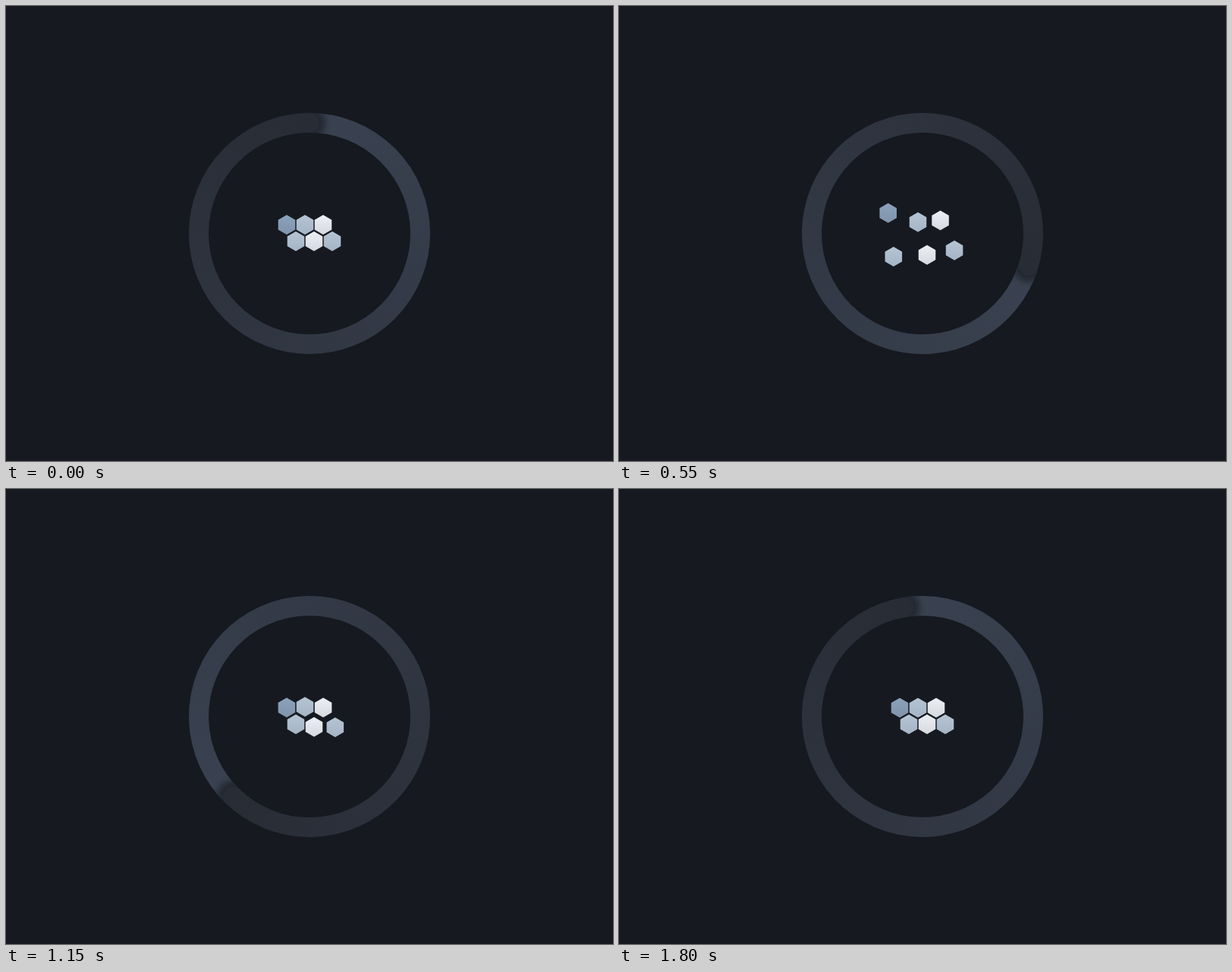
Write an HTML page with a canvas that moves like this. It is 800 px wide and 600 px high and loops after 1850 ms.

```html
<!DOCTYPE html>
<html lang="en">
<head>
<meta charset="utf-8">
<title>Hexagon loader</title>
<style>
  html, body { margin: 0; width: 100%; height: 100%; overflow: hidden; background: #161920; }
  canvas { display: block; }
</style>
</head>
<body>
<canvas id="stage" width="800" height="600"></canvas>
<script>
const ctx = document.getElementById('stage').getContext('2d');
const LOOP = 1850, STEP = 50, TAU = Math.PI * 2;
const RADIUS = 146, WIDTH = 26, CAP = WIDTH / 2;
const LIGHT = '#3a4251', DARK = '#282c35';

const white = ['#eceff3', '#d6dade'];
const pale = ['#b5c4d3', '#a5b5c6'];
const blue = ['#8ba2bb', '#8094ab'];

// Clockwise from the top right; each one starts 100 ms after the one before.
const hexes = [
  { x: 418, y: 288.4, dx: 1, dy: -1, reach: 19.6, land: 714, fill: white },
  { x: 430, y: 310.3, dx: 1, dy: 1, reach: 20, land: 704, fill: pale },
  { x: 406, y: 310.3, dx: 0, dy: 1, reach: 19.5, land: 775, fill: white },
  { x: 382, y: 310.3, dx: -1, dy: 1, reach: 20.2, land: 743, fill: pale },
  { x: 370, y: 288.4, dx: -1, dy: -1, reach: 24, land: 769, fill: blue },
  { x: 394, y: 288.4, dx: 0, dy: -1, reach: 37, land: 698, fill: pale }
];

// Smooth 0 to 1 between two times.
function ease(t, from, to) {
  const x = Math.min(1, Math.max(0, (t - from) / (to - from)));
  return (1 - Math.cos(Math.PI * x)) / 2;
}

// Out, back, then one small rebound.
function offset(t, { reach, land }) {
  const push = ease(t, 0, 255) - ease(t, 255, land);
  const rebound = ease(t, 850, 1005) - ease(t, 1005, 1165);
  return reach * push + 4.7 * rebound;
}

function drawRing(turn) {
  ctx.save();
  ctx.translate(400, 300);
  ctx.rotate(turn * TAU);

  const sweep = ctx.createConicGradient(-Math.PI / 2, 0, 0);
  sweep.addColorStop(0, LIGHT);
  sweep.addColorStop(1, DARK);
  ctx.strokeStyle = sweep;
  ctx.lineWidth = WIDTH;
  ctx.beginPath();
  ctx.arc(0, 0, RADIUS, 0, TAU);
  ctx.stroke();

  // Rounded tail end with its shadow, on the leading side only.
  ctx.beginPath();
  ctx.arc(0, 0, RADIUS + CAP, -Math.PI / 2, 0);
  ctx.arc(0, 0, RADIUS - CAP, 0, -Math.PI / 2, true);
  ctx.clip();
  const shade = ctx.createRadialGradient(0, -RADIUS, CAP, 0, -RADIUS, 30);
  shade.addColorStop(0, 'rgba(10,12,16,.52)');
  shade.addColorStop(.35, 'rgba(10,12,16,.32)');
  shade.addColorStop(.7, 'rgba(10,12,16,.07)');
  shade.addColorStop(1, 'rgba(10,12,16,0)');
  ctx.fillStyle = shade;
  ctx.fillRect(0, -RADIUS - 30, 40, 60);
  ctx.fillStyle = DARK;
  ctx.beginPath();
  ctx.arc(0, -RADIUS, CAP, 0, TAU);
  ctx.fill();
  ctx.restore();
}

function drawHex(x, y, [top, bottom]) {
  const r = 13;
  const fill = ctx.createLinearGradient(0, y - r, 0, y + r);
  fill.addColorStop(0, top);
  fill.addColorStop(1, bottom);
  ctx.fillStyle = fill;
  ctx.beginPath();
  for (let i = 0; i < 6; i++) {
    const a = i * TAU / 6;
    ctx.lineTo(x + r * Math.sin(a), y - r * Math.cos(a));
  }
  ctx.fill();
}

function draw(t) {
  ctx.fillStyle = '#161920';
  ctx.fillRect(0, 0, 800, 600);
  drawRing(t / LOOP);
  hexes.forEach((hex, i) => {
    const d = offset(t - i * 100, hex);
    drawHex(hex.x + hex.dx * d, hex.y + hex.dy * d, hex.fill);
  });
}

const start = performance.now();
function tick() {
  const t = (performance.now() - start) % LOOP;
  draw(Math.floor(t / STEP) * STEP);
  requestAnimationFrame(tick);
}
tick();
</script>
</body>
</html>
```
